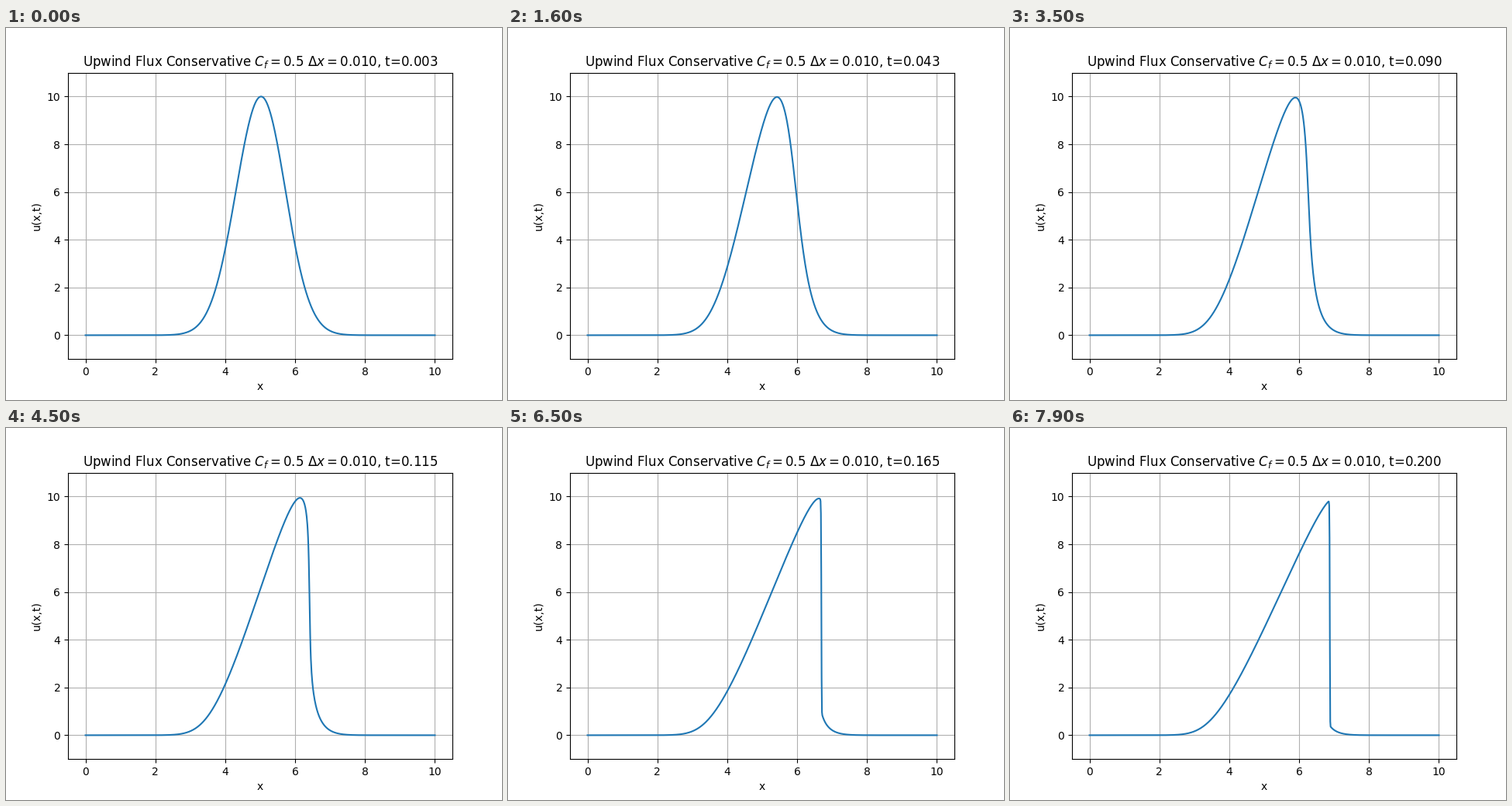
These frames come from a looping animation (640 px wide and 480 px high, 8 s). A matplotlib script:

```python
import numpy as np
import matplotlib.pyplot as plt
from matplotlib.animation import FuncAnimation

FRAMES, STEPS_PER_FRAME = 80, 5
CF, DX, U_MAX = 0.5, 0.01, 10.0
DT = CF * DX / U_MAX

x = np.linspace(0, 10, 1001)


def step(u):
    """One conservative upwind step of Burgers' equation."""
    flux = 0.5 * u**2
    new = u.copy()
    new[1:] -= DT / DX * (flux[1:] - flux[:-1])
    return new


def solve():
    u = U_MAX * np.exp(-(x - 5) ** 2)
    states = []
    for _ in range(FRAMES):
        for _ in range(STEPS_PER_FRAME):
            u = step(u)
        states.append(u)
    return states


states = solve()

fig, ax = plt.subplots(figsize=(6.4, 4.8), dpi=100)
line, = ax.plot(x, states[0])
ax.set_xlim(-0.5, 10.5)
ax.set_ylim(-1, 11)
ax.set_xlabel("x")
ax.set_ylabel("u(x,t)")
ax.grid(True)


def update(i):
    # the tiny offset makes half values round up
    t = (i + 1) * STEPS_PER_FRAME * DT + 1e-9
    line.set_ydata(states[i])
    title = ax.set_title(
        rf"Upwind Flux Conservative $C_f={CF}$ $\Delta x={DX:.3f}$, t={t:.3f}"
    )
    return line, title


anim = FuncAnimation(fig, update, frames=FRAMES, interval=100,
                     repeat=True, repeat_delay=0, blit=False)
plt.show()
```
